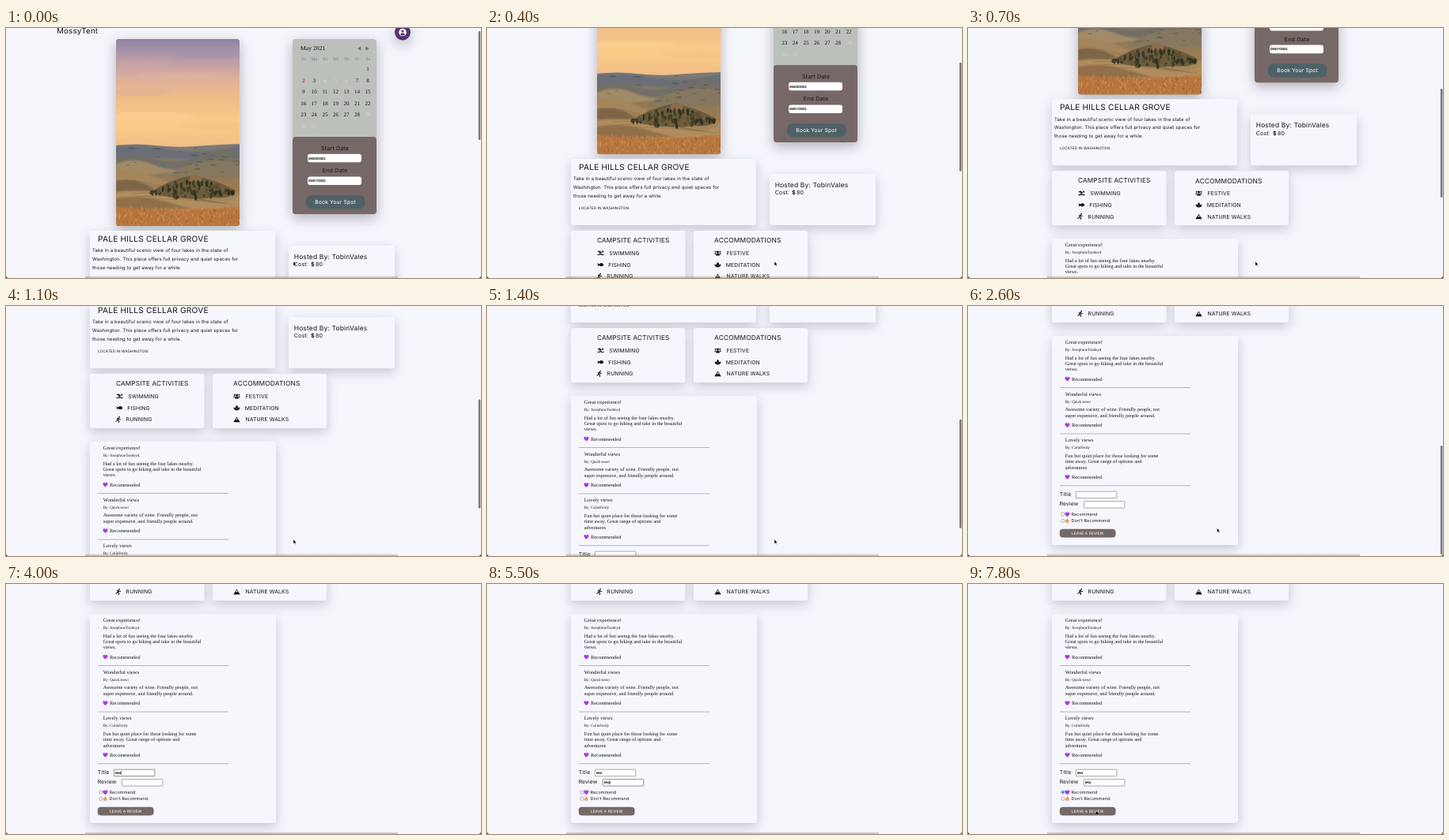
These frames come from a looping animation (600 px wide and 317 px high, 8000 ms). An HTML page:

```html
<!DOCTYPE html>
<html lang="en">
<head>
<meta charset="utf-8">
<title>Campsite page</title>
<style>
html, body { margin: 0; width: 100%; height: 100%; overflow: hidden; background: #f5f5fc; }
svg { display: block; width: 600px; height: 317px; }
text { font-family: Inter, "Open Sans", sans-serif; letter-spacing: .02em; fill: #141417; white-space: pre; text-rendering: geometricPrecision; }
.serif { font-family: "Liberation Serif", serif; letter-spacing: 0; }
.field { font-family: "Liberation Sans", sans-serif; letter-spacing: 0; fill: #000; stroke: #000; stroke-width: .12; }
.card { fill: #f6f6fd; filter: drop-shadow(0 5px 7px rgba(60, 60, 80, .24)); }
.panel { filter: drop-shadow(0 5px 8px rgba(50, 45, 60, .34)); }
</style>
</head>
<body>
<svg id="stage" viewBox="0 0 600 317">
  <defs>
    <linearGradient id="sky" x2="0" y2="1">
      <stop offset="0" stop-color="#8d84a6"/><stop offset=".17" stop-color="#b49aa8"/>
      <stop offset=".35" stop-color="#dcae9c"/><stop offset=".55" stop-color="#f0bd88"/>
      <stop offset=".78" stop-color="#fbcb87"/><stop offset="1" stop-color="#f0bd86"/>
    </linearGradient>
    <linearGradient id="land" x2="0" y2="1">
      <stop offset="0" stop-color="#7b7a7c"/><stop offset=".25" stop-color="#85765f"/>
      <stop offset=".6" stop-color="#a07c50"/><stop offset="1" stop-color="#b9783f"/>
    </linearGradient>
    <linearGradient id="edge" x2="0" y2="1">
      <stop offset="0" stop-color="#888" stop-opacity="0"/><stop offset="1" stop-color="#77777c" stop-opacity=".55"/>
    </linearGradient>
    <clipPath id="frame"><rect x="139" y="14" width="156" height="237" rx="4"/></clipPath>
    <filter id="soft"><feGaussianBlur stdDeviation="2.5"/></filter>
    <filter id="haze"><feGaussianBlur stdDeviation=".8"/></filter>
  </defs>
  <rect width="600" height="317" fill="#f5f5fc"/>
  <g id="page"></g>
  <rect x="100" y="314" width="395" height="3" fill="url(#edge)"/>
  <path d="M0 313.5Q0 317 3.5 317H0ZM600 313.5Q600 317 596.5 317H600Z" fill="#222"/>
  <rect id="thumb" x="596.8" width="2.6" height="138" rx="1.3" fill="#77777b"/>
  <g id="cursor">
    <path id="arrow" d="M0 0V5.4L1.3 4.3L2.2 6.2L3 5.8L2.2 4H3.8Z" fill="#000" stroke="#fff" stroke-width=".4"/>
    <path id="beam" d="M-1.2 -3.2Q0 -3.2 0 -2.5V2.5Q0 3.2 -1.2 3.2M1.2 -3.2Q0 -3.2 0 -2.5M0 2.5Q0 3.2 1.2 3.2" fill="none" stroke="#222" stroke-width=".6"/>
    <path id="hand" d="M-.6 0Q0 -.7 .6 0V2L2.8 2.6Q3.2 2.9 2.9 4.2L2.4 5.4H-.6L-2.2 3.2Q-2 2.6 -.6 3.4Z" fill="#000" stroke="#fff" stroke-width=".4"/>
  </g>
</svg>
<script>
const NS = 'http://www.w3.org/2000/svg';
const $ = id => document.getElementById(id);
const page = $('page');

function add(tag, attrs, parent = page) {
  const el = document.createElementNS(NS, tag);
  for (const k in attrs) el.setAttribute(k, attrs[k]);
  parent.appendChild(el);
  return el;
}
const rect = (x, y, width, height, fill, more) => add('rect', { x, y, width, height, fill, ...more });
const path = (d, fill, more) => add('path', { d, fill, ...more });
const dot = (cx, cy, r, fill, more) => add('circle', { cx, cy, r, fill, ...more });

// y is the middle of the capitals
function label(x, y, str, size, more) {
  const el = add('text', { x, y: y + size * .35, 'font-size': size, ...more });
  el.textContent = str;
  return el;
}
const serif = (x, y, str, size, more) => label(x, y, str, size, { class: 'serif', ...more });
const mid = { 'text-anchor': 'middle' };

function random(seed) {
  return () => (seed = seed * 16807 % 2147483647) / 2147483647;
}

function header() {
  label(64, 3.2, 'MossyTent', 9.8);
  dot(501, 5.5, 10, '#55336f', { class: 'panel' });
  dot(501, 5.5, 4.8, '#fff');
  dot(501, 4, 1.6, '#55336f');
  path('M498 8.6Q498.5 6.3 501 6.3T504 8.6Q501 10.6 498 8.6', '#55336f');
}

function photo() {
  rect(139, 14, 156, 237, '#a07c50', { rx: 4, class: 'panel' });
  const g = add('g', { 'clip-path': 'url(#frame)' });
  const shape = (d, fill, more) => add('path', { d, fill, ...more }, g);
  const blob = (cx, cy, rx, ry, fill, more) => add('ellipse', { cx, cy, rx, ry, fill, ...more }, g);
  const rnd = random(77);

  add('rect', { x: 139, y: 14, width: 156, height: 138, fill: 'url(#sky)' }, g);
  const clouds = [[165, 46, 45, '#cfa5a2'], [255, 34, 50, '#a090a8'], [225, 60, 60, '#e0b2a0'], [165, 82, 45, '#d9ac96'], [180, 112, 60, '#ffd595'], [265, 124, 45, '#f0bb80']];
  for (const [x, y, w, c] of clouds) blob(x, y, w, 4, c, { opacity: .55, filter: 'url(#soft)' });

  shape('M139 149Q165 146 190 149T240 150T295 147V251H139Z', 'url(#land)');
  const hills = add('g', { filter: 'url(#haze)' }, g);
  const hill = (d, fill) => add('path', { d, fill }, hills);
  hill('M139 150Q170 147 205 154T295 150V164Q240 168 200 164T139 166Z', '#696e78');
  hill('M139 164Q165 157 190 166T250 160T295 164V178H139Z', '#716e68');
  hill('M139 173Q160 163 185 173T230 181L139 190Z', '#a08a68');
  hill('M215 180Q250 164 295 168V190H205Z', '#857761');
  hill('M139 181Q172 179 205 196T295 208V232H139Z', '#a5855a');
  hill('M139 194Q170 188 190 208L139 218Z', '#80664a');
  hill('M139 208Q185 202 230 216T295 212V240H139Z', '#b08c5e');
  hill('M139 216Q165 211 190 217L234 229H139Z', '#917048');
  hill('M139 227Q200 233 295 227V251H139Z', '#b8763e');

  for (let i = 0; i < 30; i++)
    blob(139 + rnd() * 156, 152 + rnd() * 32, 1.5 + rnd() * 4, .7, '#4d5042', { opacity: .5 });
  for (let i = 0; i < 7; i++)
    shape(`M${139 + i * 5} ${194 + i * 4}Q${185 + i * 4} ${190 + i * 4} ${235 + i * 9} ${218 + i}`, 'none', { stroke: '#6f5937', 'stroke-width': .6, opacity: .45 });

  // grove on its knoll, with a farmhouse among the trees
  shape('M181 209Q208 191 236 187Q262 191 290 206Q288 217 262 215Q222 220 181 209Z', '#6d5c3c');
  shape('M232 189L239 185L247 189V195H232Z', '#8d6b4a');
  for (let i = 0; i < 130; i++) {
    const u = rnd(), arch = Math.sin(u * Math.PI);
    const x = 182 + u * 106, y = 209 + (rnd() * 1.3 - .9) * 17 * arch;
    blob(x, y, .8 + rnd() * 1.1, 1.6 + rnd() * 2.3, ['#2f3021', '#413e29', '#5a5031'][i % 3]);
  }

  for (let i = 0; i < 240; i++) {
    const x = 139 + rnd() * 156, y = 229 + rnd() * 23;
    shape(`M${x} ${y}l${rnd() * 3 - 1.5} ${-1.5 - rnd() * 2.5}`, 'none', { stroke: ['#d0935c', '#8d5630', '#dda56c'][i % 3], 'stroke-width': .6 });
  }
}

function booking() {
  rect(362, 14, 106, 222, '#bcc0bb', { rx: 4, class: 'panel' });
  rect(362, 138, 106, 98, '#766866', { rx: 4 });
  serif(372, 25.2, 'May 2021', 7.7);
  path('M448.3 23.3V28.7L444 26ZM454.3 23.3V28.7L458.6 26Z', '#6f736f');
  const col = i => 375.8 + i * 13.55;
  ['Su', 'Mo', 'Tu', 'We', 'Th', 'Fr', 'Sa'].forEach((d, i) => serif(col(i), 39, d, 5.7, { ...mid, style: 'fill:#777c78' }));
  const taken = [4, 5, 6, 29, 30, 31];
  for (let d = 1; d <= 31; d++) {
    const cell = d + 5;
    const fill = d === 2 ? '#dc3a1a' : taken.includes(d) ? '#d3d6d1' : '#111';
    serif(col(cell % 7), 52 + Math.floor(cell / 7) * 14.45, d, 7, { ...mid, style: `fill:${fill};font-weight:${d === 2 ? 700 : 400}` });
  }
  [['Start Date', '05/03/2021', 152.3], ['End Date', '05/07/2021', 181]].forEach(([name, date, y]) => {
    label(415.5, y, name, 7.1, mid);
    rect(381, y + 7.4, 68, 10.6, '#fff', { rx: 3 });
    label(382, y + 12.8, date, 4.4, { class: 'field' });
  });
  rect(379, 212, 74.5, 17.5, '#4e6166', { rx: 7 });
  label(416, 220.8, 'Book Your Spot', 6.8, { ...mid, style: 'fill:#fff' });
}

const card = (x, y, w, h) => rect(x, y, w, h, '#f6f6fd', { rx: 3, class: 'card' });

function details() {
  card(106, 257, 234, 84);
  label(116, 267.6, 'PALE HILLS CELLAR GROVE', 10.2);
  ['Take in a beautiful scenic view of four lakes in the state of',
    'Washington. This place offers full privacy and quiet spaces for',
    'those needing to get away for a while.'].forEach((s, i) => label(109, 282.3 + i * 10.7, s, 6));
  label(116, 319, 'LOCATED IN WASHINGTON.', 4.7);
  card(357, 276, 134, 65);
  label(363.7, 290, 'Hosted By: TobinVales', 8.45);
  label(363.7, 300, 'Cost:', 7.1);
  label(385, 300, '$', 7.1, { 'font-weight': 700 });
  label(391, 300, '80', 7.1);
}

const icons = {
  swim: 'M-3.8 -2.4L-.8 -3L2 -.2L-3 .4L-.9 -1.3L-3.4 -1.4ZM1.6 -1.8A1.1 1.1 0 1 1 3.8 -1.8A1.1 1.1 0 1 1 1.6 -1.8M-4 1Q-2.6 2 -1.3 1T1.3 1T4 1V2.4Q2.6 3.2 1.3 2.4T-1.3 2.4T-4 2.4Z',
  fish: 'M-4 -2.3L-1.8 -.8Q1.6 -3.8 4 0Q1.6 3.8 -1.8 .8L-4 2.3L-3.3 0Z',
  run: 'M.3 -3.4A.9 .9 0 1 1 2.1 -3.4A.9 .9 0 1 1 .3 -3.4M-2.4 -2L.6 -2.4L1.6 -.9H2.9V-.1H1.2L.6 -.9L0 .4L1.3 1.5L.7 4H-.2L.2 2L-1.2 .9L-1.9 2.5H-3.6V1.6H-2.5L-.8 -1.5L-2.2 -1.2Z',
  group: 'M-1.5 -1.5A1.5 1.5 0 1 1 1.5 -1.5A1.5 1.5 0 1 1 -1.5 -1.5M-2.4 3V1.8Q-2.2 .4 0 .4T2.4 1.8V3ZM-3.9 -1.7A1 1 0 1 1 -1.9 -1.7A1 1 0 1 1 -3.9 -1.7M1.9 -1.7A1 1 0 1 1 3.9 -1.7A1 1 0 1 1 1.9 -1.7M-4.2 1.5Q-4.2 -.4 -2.2 -.2L-2.8 1.5ZM4.2 1.5Q4.2 -.4 2.2 -.2L2.8 1.5Z',
  lotus: 'M0 -3.4Q2 -1.6 1.5 .2L0 1.4L-1.5 .2Q-2 -1.6 0 -3.4M-4 -.6Q-1.2 -.6 0 1.8Q1.2 -.6 4 -.6Q3.8 3.2 0 3.2T-4 -.6',
  hill: 'M0 -3.4L4.2 3.2H-4.2ZM0 -2L-1.3 0L-.5 .6L.2 -.1L1 .5L1.4 0Z'
};

function lists() {
  card(106, 348, 144.5, 69);
  card(261, 348, 144, 69);
  label(139, 360.5, 'CAMPSITE ACTIVITIES', 8.2);
  label(287, 360.5, 'ACCOMMODATIONS', 8.4);
  [[143.5, [['swim', 'SWIMMING', 154.2], ['fish', 'FISHING', 153.3], ['run', 'RUNNING', 151.6]]],
    [291.5, [['group', 'FESTIVE', 302.6], ['lotus', 'MEDITATION', 301.8], ['hill', 'NATURE WALKS', 302.5]]]
  ].forEach(([x, rows]) => rows.forEach(([icon, name, tx], i) => {
    const y = 376.4 + i * 14.8;
    path(icons[icon], '#111', { transform: `translate(${x - (icon === 'run' ? 1.5 : 0)} ${y})`, 'fill-rule': 'evenodd' });
    label(tx, y, name, 6.85);
  }));
}

const heart = (x, y) => path('M0 3C-4.6 -.4 -3 -2.8 -1.6 -2.8Q-.4 -2.8 0 -1.6Q.4 -2.8 1.6 -2.8C3 -2.8 4.6 -.4 0 3', '#a93be0', { transform: `translate(${x} ${y})` });

function reviews() {
  card(106, 434, 235, 265);
  [[441.3, 'Great experience!', 'JosephineTarnley4', ['Had a lot of fun seeing the four lakes nearby.', 'Great spots to go hiking and take in the beautiful', 'views.']],
    [507.2, 'Wonderful views', 'Quick-newt', ['Awesome variety of wine. Friendly people, not', 'super expensive, and friendly people around.']],
    [565.6, 'Lovely views', 'ColinFerdy', ['Fun but quiet place for those looking for some', 'time away. Great range of options and', 'adventures']]
  ].forEach(([y, title, who, lines]) => {
    serif(122.7, y, title, 6.65);
    serif(122.7, y + 10.1, 'By: ' + who, 5);
    lines.forEach((s, i) => serif(122.7, y + 20 + i * 7.4, s, 6.35));
    const end = y + 25 + lines.length * 7.4;
    heart(125.5, end);
    serif(131, end, 'Recommended', 6.4);
    rect(116, end + 10.7, 165, .7, '#98989d');
  });
}

function input(x, y) {
  const box = rect(x, y, 51.5, 8.4, '#fff', { rx: .6, stroke: '#88888c', 'stroke-width': .7 });
  const text = label(x + 1.6, y + 4.2, '', 4.4, { class: 'field' });
  const caret = rect(x, y + 1.7, .5, 5, '#000');
  return (str, focus) => {
    text.textContent = str;
    box.setAttribute('stroke', focus ? '#66666b' : '#88888c');
    caret.setAttribute('x', x + 1.9 + text.getComputedTextLength());
    caret.setAttribute('opacity', focus ? 1 : 0);
  };
}

header();
photo();
booking();
details();
lists();
reviews();

label(115.7, 634.8, 'Title', 6.8);
label(115.7, 647, 'Review', 6.8);
const titleBox = input(136.4, 631.2), reviewBox = input(146.4, 643.7);
const radio = { stroke: '#77777b', 'stroke-width': .6 };
const yes = dot(119.8, 660, 2.1, '#fff', radio);
dot(119.8, 668.3, 2.1, '#fff', radio);
const pick = dot(119.8, 660, 1.2, '#1b6ee0');
heart(125.4, 660.2);
path('M125.2 665.3Q126.2 666.6 127 667.2Q128.6 670.8 125.4 671.2Q122 670.9 123.4 667.6L124.3 668.2Q124.2 666.2 125.2 665.3', '#ee8a4a');
path('M125.4 668.2Q127 670.3 125.4 671Q123.8 670.4 125.4 668.2', '#ffd7a0');
label(130.6, 660.3, 'Recommend', 5.4);
label(130.6, 668.6, "Don't Recommend", 5.4);
rect(116, 679, 70.3, 10.3, '#756967', { rx: 3.6, stroke: '#5f5553', 'stroke-width': .4 });
label(151.3, 684.2, 'LEAVE A REVIEW', 4.85, { ...mid, style: 'fill:#fff' });

// time, offset, speed
const scrollKeys = [[0, 0, .17], [400, 91, .245], [1100, 262, .21], [1800, 373, .085], [2600, 396, 0]];
function scrollAt(t) {
  const i = scrollKeys.findIndex(k => k[0] > t);
  if (i < 0) return 396;
  const [t0, a, m] = scrollKeys[i - 1], [t1, b, n] = scrollKeys[i];
  const d = t1 - t0, u = (t - t0) / d, v = 1 - u;
  return a * v * v * (1 + 2 * u) + b * u * u * (3 - 2 * u) + d * u * v * (m * v - n * u);
}

// time, x, y
const mouseKeys = [[0, 363, 296], [2300, 363, 296], [3200, 176, 240], [4100, 176, 240], [4500, 176, 252.5],
  [5600, 165, 252.5], [6300, 120, 264], [6600, 120, 264], [7400, 158, 287], [7500, 162, 287], [8000, 162, 287]];
function mouseAt(t) {
  const i = mouseKeys.findIndex(k => k[0] > t);
  const [t0, x0, y0] = mouseKeys[i - 1], [t1, x1, y1] = mouseKeys[i];
  const u = (t - t0) / (t1 - t0), e = u * u * (3 - 2 * u);
  return [x0 + (x1 - x0) * e, y0 + (y1 - y0) * e];
}

const typed = (t, times) => 'test'.slice(0, times.filter(k => t >= k).length);
const show = (el, on) => el.setAttribute('opacity', on ? 1 : 0);

function draw(t) {
  const s = scrollAt(t);
  page.setAttribute('transform', `translate(0 ${-s})`);
  $('thumb').setAttribute('y', 4 + s * .437);
  $('thumb').setAttribute('opacity', Math.max(0, Math.min(1, (3200 - t) / 400)));

  titleBox(typed(t, [3500, 3600, 3800, 4000]), t >= 3300 && t < 4400);
  reviewBox(typed(t, [4800, 5000, 5200, 5500]), t >= 4400 && t < 6500);
  show(pick, t >= 6500);
  yes.setAttribute('stroke', t >= 6500 ? '#1b6ee0' : '#77777b');

  const [x, y] = mouseAt(t);
  $('cursor').setAttribute('transform', `translate(${x} ${y})`);
  const typing = t >= 3500 && t < 4200 || t >= 4800 && t < 5700;
  const beam = t >= 3100 && t < 5900, hand = t >= 7400;
  show($('cursor'), !typing);
  show($('beam'), beam);
  show($('hand'), hand);
  show($('arrow'), !beam && !hand);
}

const start = performance.now();
function tick() {
  draw(Math.floor((performance.now() - start) % 8000 / 100) * 100);
  requestAnimationFrame(tick);
}
tick();
</script>
</body>
</html>
```
